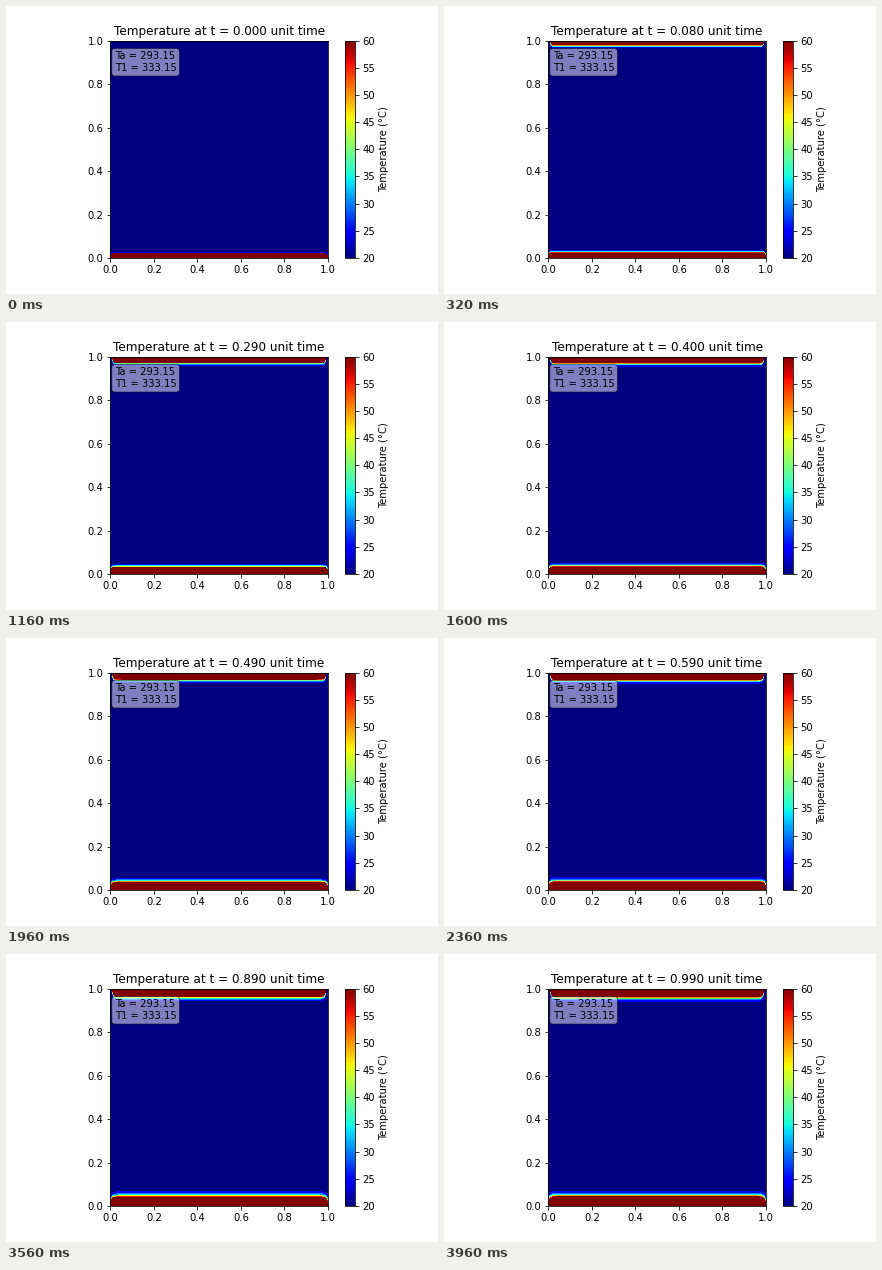
Animation of 432x288 px, one loop 4000 ms. Source, as a matplotlib script:

```python
import numpy as np
import matplotlib.pyplot as plt
from matplotlib.animation import FuncAnimation
from matplotlib.cm import ScalarMappable
from matplotlib.colors import Normalize

N = 100
FRAMES = 100
COLD, HOT = 20.0, 333.15
RATE_LOW, RATE_HIGH = 0.020, 0.0135

plt.rcParams.update({
    "font.family": "DejaVu Sans",
    "font.size": 10,
    "figure.subplot.left": 0.125,
    "figure.subplot.right": 0.9,
    "figure.subplot.bottom": 0.125,
    "figure.subplot.top": 0.88,
})


def set_edges(T, top):
    """Cold side walls, hot plates at the bottom and (later) the top."""
    half = N // 2
    T[:, [0, -1]] = COLD
    T[half:, [1, -2]] = COLD
    T[0] = HOT
    T[1, 1:-1] = HOT
    if top:
        T[-2:, 2:-2] = HOT


def simulate():
    rate = np.where(np.arange(N) < N // 2, RATE_LOW, RATE_HIGH)[1:-1, None]
    T = np.full((N, N), COLD)
    states = []
    for i in range(FRAMES):
        set_edges(T, i > 0)
        lap = (T[2:, 1:-1] + T[:-2, 1:-1] + T[1:-1, 2:] + T[1:-1, :-2]
               - 4 * T[1:-1, 1:-1])
        T[1:-1, 1:-1] += rate * lap
        set_edges(T, i > 0)
        states.append(T.copy())
    return states


states = simulate()
grid = np.linspace(0, 1, N)
norm = Normalize(20, 60)
levels = np.append(np.arange(17.5, 60, 5), 400)
cmap = plt.get_cmap("jet")
mids = np.append(np.arange(20, 60, 5), 60)
colors = cmap(norm(mids))

fig, ax = plt.subplots(figsize=(6, 4), dpi=72)
ax.set_aspect("equal")
ax.set_xlim(0, 1)
ax.set_ylim(0, 1)
bar = fig.colorbar(ScalarMappable(norm, cmap), ax=ax, ticks=range(20, 61, 5))
bar.set_label("Temperature (°C)")
title = ax.set_title("", fontsize=12)
ax.text(0.02, 0.95, "Ta = 293.15\nT1 = 333.15", transform=ax.transAxes,
        va="top", bbox=dict(boxstyle="round", facecolor="white", alpha=0.5))

field = None


def draw(i):
    global field
    if field is not None:
        field.remove()
    field = ax.contourf(grid, grid, states[i], levels=levels, colors=colors)
    title.set_text(f"Temperature at t = {i * 0.01:.3f} unit time")
    return field, title


def reset():
    return draw(0)


anim = FuncAnimation(fig, draw, frames=FRAMES, init_func=reset,
                     interval=40, repeat=True, repeat_delay=0, blit=False)
plt.show()
```
